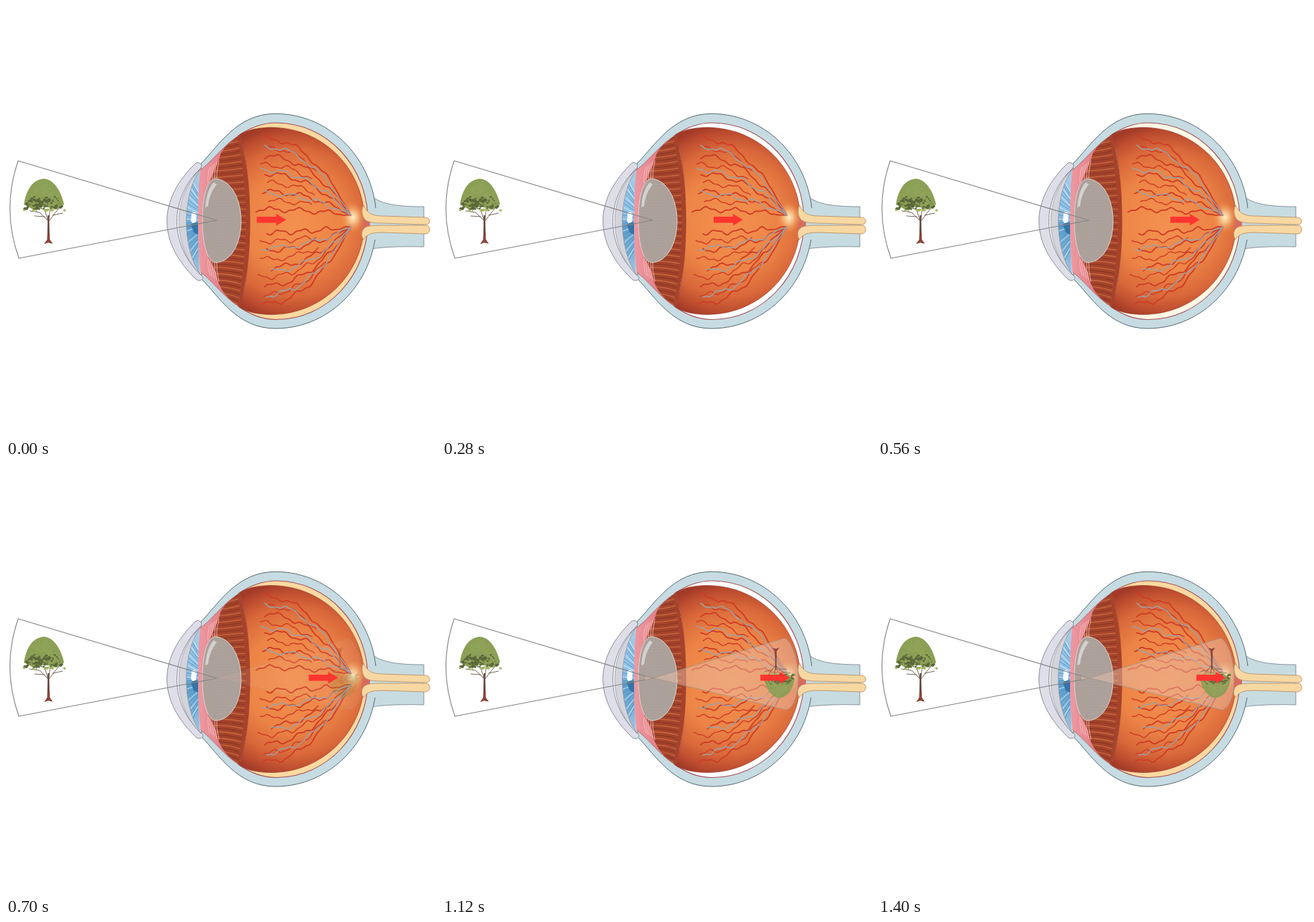
Animation, 600 px wide and 600 px high, one loop 1.47 s. Source, as an HTML page:

```html
<!DOCTYPE html>
<html lang="en">
<head>
<meta charset="utf-8">
<title>How the eye sees</title>
<style>
html, body { margin: 0; width: 100%; height: 100%; overflow: hidden; background: #fff; }
svg { display: block; width: 100vw; height: 100vh; }
.line { fill: none; stroke-linecap: round; stroke-linejoin: round; }
</style>
</head>
<body>
<svg viewBox="0 0 600 600">
  <defs>
    <radialGradient id="retina" gradientUnits="userSpaceOnUse" cx="402" cy="302" r="138">
      <stop offset="0" stop-color="#f4914f"/>
      <stop offset=".5" stop-color="#ec8446"/>
      <stop offset=".75" stop-color="#d9683a"/>
      <stop offset=".9" stop-color="#bd4d2f"/>
      <stop offset="1" stop-color="#a23a28"/>
    </radialGradient>
    <radialGradient id="disc">
      <stop offset="0" stop-color="#fff0c8"/>
      <stop offset=".35" stop-color="#fbd29a" stop-opacity=".8"/>
      <stop offset="1" stop-color="#f0944c" stop-opacity="0"/>
    </radialGradient>
    <linearGradient id="pink">
      <stop offset="0" stop-color="#ee9aa2"/>
      <stop offset="1" stop-color="#d45f69"/>
    </linearGradient>
    <linearGradient id="iris" x2="0" y2="1">
      <stop offset="0" stop-color="#a9cfe8"/>
      <stop offset=".45" stop-color="#8fc1e6"/>
      <stop offset=".55" stop-color="#5a9ccb"/>
      <stop offset="1" stop-color="#a9cfe8"/>
    </linearGradient>
    <clipPath id="oraClip"><path d="M326 180C346 252 346 348 326 420C309 407 297 397 293 372L282 350V250L298 212C300 199 313 190 326 180Z"/></clipPath>
    <clipPath id="irisClip"><path d="M271 222C244 262 244 338 271 378C267 340 267 262 271 222Z"/></clipPath>
    <path id="lens" d="M292 241C314 242 328 270 328 300C328 332 314 357 293 358C280 357 274 330 274 299C274 268 280 242 292 241Z"/>
    <clipPath id="lensClip"><use href="#lens"/></clipPath>
    <path id="cone" d="M284 302L478 243C488 247 497 274 497 299C497 321 491 341 480 343L284 296"/>
    <g id="tree">
      <path class="line" stroke="#574638" stroke-width=".8" d="M59 300L47 288L33 286M54 294L40 293M58 298L53 280M60 298L62 278M60 300L70 287L76 280M65 292L79 289"/>
      <path fill="#8b9f55" d="M25 277C27 262 34 243 52 241C68 241 78 262 81 277L70 284L55 280L38 284Z"/>
      <g id="leaves"></g>
      <path fill="#66483d" d="M58.2 292H60.2L61 326L65 331.5L59 330L53.5 332L57.6 326Z"/>
      <path fill="#8d4238" d="M58 317H60.8L61.2 326L65 331.5L59 330L53.5 332L57.6 326Z"/>
    </g>
  </defs>

  <path d="M510 265C521 275 540 280 583 280V336C542 335 524 337 508 339Z" fill="#c7dce1" stroke="#7d8b92" stroke-width=".9"/>
  <path d="M272 220C297 195 322 150.3 376 150.3C454 150.3 517 217 517 300C517 383 454 450 376 450C322 450 297 405 273 381Z" fill="#c6dce2" stroke="#5c6b72"/>
  <path d="M506 282H530V326H506Z" fill="#c7dce1"/>
  <path id="ring" d="M324 181C340 170 356 163 377 163C448 163 505 224 505 300C505 376 448 437.5 377 437.5C356 437.5 340 430 324 419Z" stroke="#a5525d" stroke-width="1.1"/>

  <path d="M267 232C288 218 304 192 328 179L344 300L328 421C304 408 288 382 267 368Z" fill="url(#pink)" stroke="#a35561" stroke-width=".7"/>
  <g clip-path="url(#oraClip)">
    <path d="M270 170H350V430H270Z" fill="#a5432b"/>
    <g id="stripes" class="line"></g>
  </g>
  <g id="zonules" class="line" stroke="#f6c6c3" stroke-width=".8"></g>
  <path d="M284 250Q279 257 280 264L285 259ZM284 350Q279 344 281 336L286 343Z" fill="#a83329"/>

  <path d="M326 179.5C336 173 352 169.5 370 169.5C442 169.5 500 227 500 300C500 373 442 430.5 370 430.5C352 430.5 336 427 326 420.5C345 364 345 236 326 179.5Z" fill="url(#retina)" stroke="#9a3a2a" stroke-width=".7"/>
  <path d="M497 284L508 296V306L497 318Z" fill="#d66b5d"/>
  <ellipse cx="484" cy="295" rx="17" ry="22" fill="url(#disc)"/>
  <g id="vessels" class="line"></g>

  <g fill="#f8d8a2" stroke="#b58b62" stroke-width=".8">
    <path d="M499 278C504 289 511 293 526 293L586 295C593 296 593 305 586 305L524 303C510 303 503 301 500 297C496 291 496 283 499 278Z"/>
    <path d="M499 326C503 318 511 316 526 316L586 318C593 317 593 306 586 306L524 306C510 306 502 307 499 311C495 315 496 323 499 326Z"/>
  </g>

  <path d="M272 223C239 265 239 337 273 379C266 350 266 252 272 223Z" fill="#d6d7df"/>
  <g clip-path="url(#irisClip)">
    <path d="M240 215H275V385H240Z" fill="url(#iris)"/>
    <g id="rays" class="line" stroke-width=".8"></g>
    <path d="M259 289Q264 285 266 292L265 302Q260 306 258 299Z" fill="#f5fafc"/>
    <path d="M258 305Q264 300 268 303V319L262 316Z" fill="#3375a7"/>
  </g>
  <path d="M271 222C244 262 244 338 271 378" class="line" stroke="#68737e" stroke-width=".9"/>
  <path d="M265 219C270 217 275 222 272 226C227 268 227 335 274 377C277 381 271 385 266 382C211 330 211 271 265 219Z" fill="#dddee8" stroke="#80838d" stroke-width=".9"/>
  <path d="M271 228C231 267 231 335 272 376C245 338 245 265 271 228Z" fill="#d3d4dc" stroke="#8b8d98" stroke-width=".7"/>

  <use href="#lens" fill="#aba09a" stroke="#dad7d5"/>
  <g id="bands" class="line" clip-path="url(#lensClip)" stroke="#b9aaa1" stroke-width=".7" opacity=".55"></g>
  <path d="M278 281Q280 256 290 246L294 249Q284 261 282 279Z" fill="#d9dad9" opacity=".85"/>

  <path d="M17 216L294 299L18 352Q-6.5 284 17 216Z" class="line" stroke="#858585" stroke-width="1.1"/>
  <use href="#tree"/>

  <g id="image">
    <use href="#cone" fill="#e8c0aa" fill-opacity=".47"/>
    <use href="#cone" class="line" stroke="#a4948d" stroke-width=".8"/>
    <use href="#tree" transform="translate(511.4 512) scale(-.77)" opacity=".92"/>
  </g>
  <path id="arrow" d="M350 294H377V290L391 298.3L377 306.5V302.5H350Z" fill="#ff3530"/>
</svg>
<script>
const $ = id => document.getElementById(id);

let seed = 11;
const rand = (a, b) => {
  seed = seed * 16807 % 2147483647;
  return a + (b - a) * seed / 2147483647;
};

function add(parent, d, attrs) {
  const p = document.createElementNS('http://www.w3.org/2000/svg', 'path');
  for (const [k, v] of Object.entries({ d, ...attrs })) p.setAttribute(k, v);
  $(parent).append(p);
}

// A wavy vessel that leaves the optic disc steeply and levels off toward the lens.
function vessel(side, reach, from, to, color, width) {
  const phase = rand(0, 6), wave = rand(.14, .2), points = [];
  for (let x = from; x > to; x -= 3) {
    const u = (481 - x) / 125;
    const rise = 8 + (reach - 8) * (1 - Math.abs(1 - u) ** 2.2);
    const wobble = 3 * Math.sin(x * wave + phase) + 1.2 * Math.sin(x * .45 + phase);
    points.push(`${x} ${(300 + side * rise + wobble * Math.min(1, u * 4)).toFixed(1)}`);
  }
  add('vessels', 'M' + points.join('L'), { stroke: color, 'stroke-width': width });
}

for (const side of [-1, 1]) {
  for (let i = 0; i < 9; i++) {
    const start = i % 2 ? rand(425, 450) : 481;
    vessel(side, 16 + i * 12.5, start, rand(348, 368), '#cf3d26', i % 2 ? 1.4 : 1.8);
  }
  for (let i = 0; i < 3; i++) vessel(side, 38 + i * 33, 481, rand(353, 372), '#9aa3aa', 1.4);
}

// Rows inside the eye, spread evenly about its axis at y = 300.
function rows(count, gap, drawRow) {
  for (let i = 0; i < count; i++) drawRow((i - (count - 1) / 2) * gap, i);
}

rows(50, 4.75, (dy, i) => {
  const end = 334 - (dy / 120) ** 2 * 12;
  add('stripes', `M280 ${300 + dy * .94}Q308 ${299 + dy * .94} ${end} ${300 + dy}`,
    { stroke: i % 2 ? '#c56a42' : '#8b3824', 'stroke-width': 1.4 });
});
rows(26, 6, (dy, i) => add('rays', `M250 ${300 + dy}Q261 ${300 + dy * .72} 268 ${300 + dy * .55}`,
  { stroke: i % 3 ? '#4d90bf' : '#e3f2fa' }));
rows(29, 4, dy => add('bands', `M273 ${300 + dy}Q302 ${303 + dy} 330 ${300 + dy}`));
for (const side of [-1, 1]) {
  rows(5, 3, dx => add('zonules',
    `M${291 + dx} ${300 + side * (80 + dx * .7)}Q${287 + dx} ${300 + side * 68} ${288 + dx} ${300 + side * 53}`));
}

// Foliage: a dome of small leaves, darker toward the bottom.
for (let i = 0; i < 190; i++) {
  const h = Math.sqrt(rand(0, 1)), x = 53 + rand(-29, 29) * h ** .7, y = 241 + 45 * h;
  const dark = h > .55 && h < .95 && rand(0, 1) < (x < 60 ? .9 : .45);
  const r = rand(1.2, 2.6);
  add('leaves', `M${x - r} ${y}q${r} ${-r * 1.6} ${r * 2} ${-r * .3}q${-r * .4} ${r * 1.7} ${-r * 2} ${r * .3}`,
    { fill: dark ? '#5b663a' : h > .95 ? '#a3b763' : '#8fa45a' });
}

const STEP = 70, STEPS = 21, FADE = 10, ARROW_STOP = 13;
const clamp = v => Math.min(1, Math.max(0, v));

function draw(time) {
  const n = Math.floor(time / STEP) % STEPS;
  const white = clamp(1.25 * Math.abs(Math.sin(Math.PI * n / FADE)));
  $('ring').setAttribute('fill', `hsl(${37 + 10 * white}, 94%, ${81 + 19 * white}%)`);
  $('arrow').setAttribute('transform', `translate(${Math.min(n, ARROW_STOP) * 7.25} 0)`);
  $('image').setAttribute('opacity', clamp((n - 8) / 8));
}

const start = performance.now();
function tick() {
  draw(performance.now() - start);
  requestAnimationFrame(tick);
}
tick();
</script>
</body>
</html>
```
